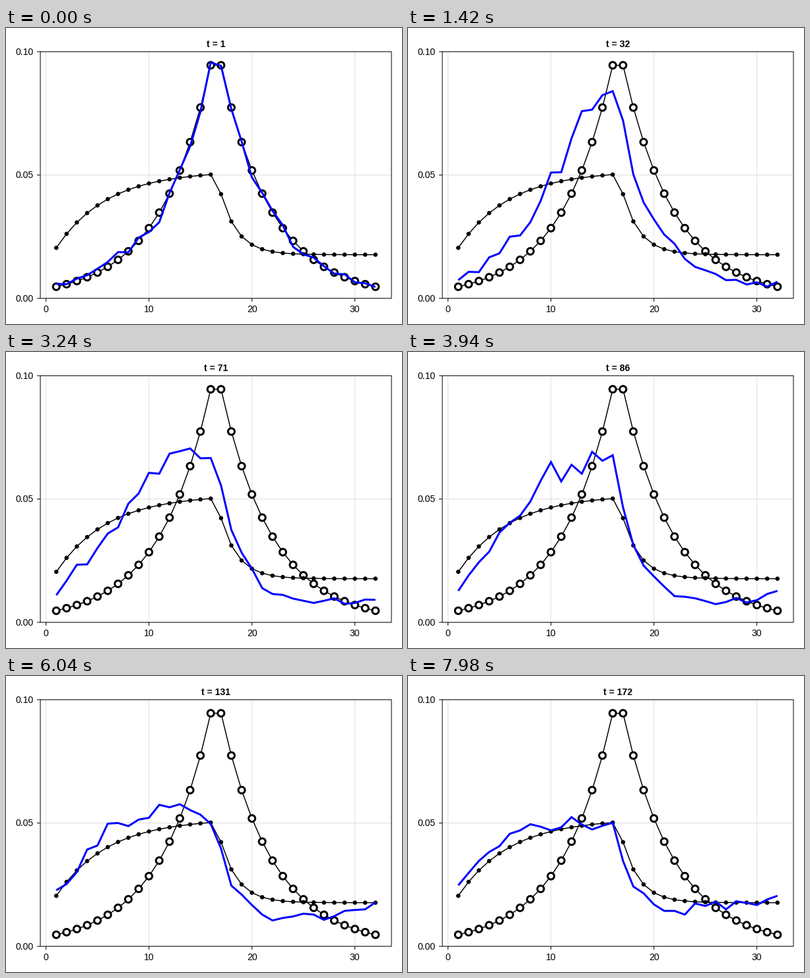
Write a matplotlib script that moves like this. It is 600 by 450 pixels and loops after 8000 ms.

```python
import numpy as np
import matplotlib.pyplot as plt
from matplotlib.animation import FuncAnimation

W, H, DPI = 600, 450, 100
PX = 72 / DPI
LEFT, RIGHT, TOP, BOTTOM = 52, 584, 36, 411
FONT = dict(family="Liberation Sans", fontsize=14 * PX, color="black")

SITES, STEPS, WALKERS = 32, 172, 8000
SLOPE, DRIVE, RATE = 0.2, 0.4, 0.46

# Walkers hop on a ring in a V-shaped potential while a steady force drives them left.
site = np.arange(1, SITES + 1)
energy = SLOPE * np.abs(site - 16.5)
start = np.exp(-energy) / np.exp(-energy).sum()

climb = np.roll(energy, -1) - energy
inward = RATE / (1 + np.exp(-(DRIVE + climb)))  # hop left over the bond on a site's right
hop_right = RATE - inward
hop_left = np.roll(inward, 1)


def steady_state():
    ring = np.eye(SITES)
    step = (np.diag(1 - hop_left - hop_right)
            + np.roll(ring, -1, axis=0) * hop_left
            + np.roll(ring, 1, axis=0) * hop_right)
    return np.linalg.matrix_power(step, 5000)[:, 0]


def walk():
    """Share of the walkers on every site, step by step."""
    rng = np.random.default_rng(3)
    pos = rng.choice(SITES, size=WALKERS, p=start)
    shares = []
    for _ in range(STEPS):
        shares.append(np.bincount(pos, minlength=SITES) / WALKERS)
        u = rng.random(WALKERS)
        move = (u > 1 - hop_right[pos]).astype(int) - (u < hop_left[pos])
        pos = (pos + move) % SITES
    return np.array(shares)


def px_x(x):
    return LEFT + (RIGHT - LEFT) * (np.asarray(x) + 0.55) / 34.1


def px_y(p):
    return BOTTOM - (BOTTOM - TOP) * np.asarray(p) / 0.1


fig = plt.figure(figsize=(W / DPI, H / DPI), dpi=DPI, facecolor="white")
ax = fig.add_axes([0, 0, 1, 1])
ax.set_xlim(0, W)
ax.set_ylim(H, 0)
ax.axis("off")


def line(x, y, width, color="black", **kw):
    return ax.plot(x, y, lw=width * PX, color=color, snap=False,
                   solid_joinstyle="miter", solid_capstyle="butt", **kw)[0]


def dotted_curve(p, size, edge, fill):
    line(px_x(site), px_y(p), 1.5)
    # One size per dot keeps their places exact to a fraction of a pixel.
    ax.scatter(px_x(site), px_y(p), s=np.full(SITES, (size * PX) ** 2),
               linewidths=edge * PX, edgecolors="black", facecolors=fill,
               snap=False, zorder=2)


for tick in (0, 10, 20, 30):
    x = px_x(tick)
    line([x, x], [TOP, BOTTOM], 1, alpha=0.12)
    line([x, x], [BOTTOM, BOTTOM + 5], 1)
    ax.text(x, 432, str(tick), ha="center", va="baseline", **FONT)
for tick in (0, 0.05, 0.1):
    y = px_y(tick)
    line([LEFT, RIGHT], [y, y], 1, alpha=0.12)
    line([LEFT - 5, LEFT], [y, y], 1)
    ax.text(41.3, y + 5, f"{tick:.2f}", ha="right", va="baseline", **FONT)
line([LEFT, RIGHT, RIGHT, LEFT, LEFT], [TOP, TOP, BOTTOM, BOTTOM, TOP], 1)

dotted_curve(start, 10, 3, "white")
dotted_curve(steady_state(), 6.5, 0, "black")

density = walk()
curve = line(px_x(site), px_y(density[0]), 3, "blue", zorder=3)
title = ax.text(318, 29, "", ha="center", va="baseline", weight="bold", **FONT)


def update(i):
    # Steps come in threes: two short ones, then a long one.
    cycle, tick = divmod(i + 1, 7)
    t = 3 * cycle + min(tick, 2)
    curve.set_ydata(px_y(density[t - 1]))
    title.set_text(f"t = {t}")
    return curve, title


anim = FuncAnimation(fig, update, frames=400, interval=20, repeat=True, repeat_delay=0)
plt.show()
```
